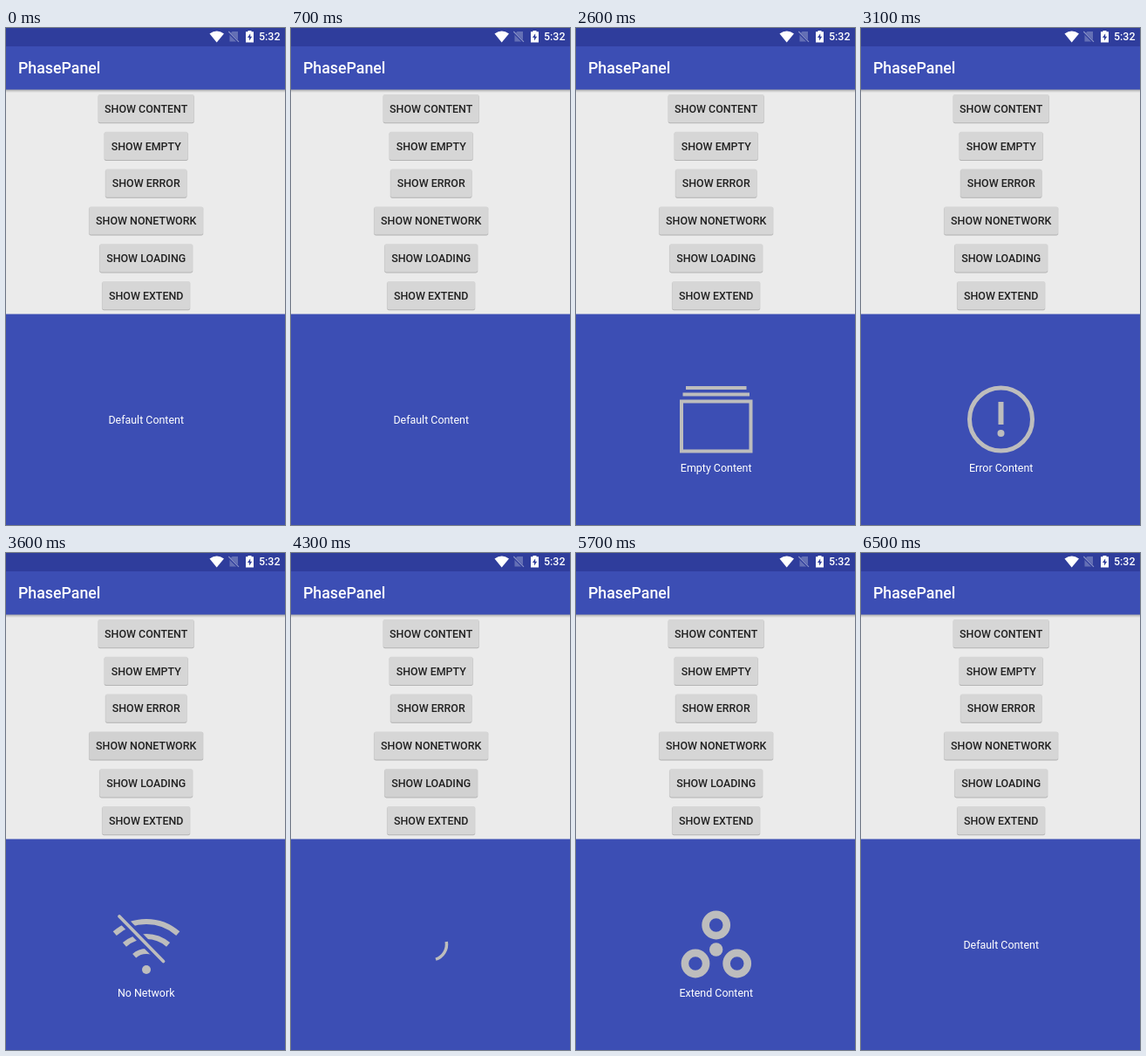
Animation of 320 by 569 pixels, one loop 6.6 s. Source, as an HTML page:

```html
<!DOCTYPE html>
<html lang="en">
<head>
<meta charset="utf-8">
<title>Status panel</title>
<style>
  html, body { margin: 0; width: 100%; height: 100%; overflow: hidden; background: #3c4eb4; }
  svg { display: block; width: 100%; height: 100%; }
  text { font-family: Roboto, sans-serif; font-size: 12.44px; fill: #fff; }
  .mid { text-anchor: middle; }
  .label { font-weight: 500; fill: #212121; }
  .line { fill: none; stroke: #bdbdbd; }
  .solid { fill: #bdbdbd; }
</style>
</head>
<body>
<svg viewBox="0 0 320 569" xmlns="http://www.w3.org/2000/svg">
  <defs>
    <linearGradient id="shade" x2="0" y2="1">
      <stop offset="0" stop-color="#000" stop-opacity=".3"/>
      <stop offset="1" stop-color="#000" stop-opacity="0"/>
    </linearGradient>
  </defs>
  <rect width="320" height="569" fill="#ebebeb"/>
  <rect y="70" width="320" height="4" fill="url(#shade)"/>
  <rect width="320" height="70.5" fill="#3c4eb4"/>
  <rect width="320" height="21" fill="#2f3d9c"/>
  <rect y="327.5" width="320" height="242" fill="#3c4eb4"/>

  <!-- status bar -->
  <path d="M233.5 6.6Q241.7 .6 250 6.6L241.7 16.4Z" fill="#fff"/>
  <path d="M259.5 4H266V15.5H256.5V7Z" fill="#6470b5"/>
  <path d="M255 4.5L267 16.5" stroke="#2f3d9c" stroke-width="2.6"/>
  <path d="M255.3 4L267 15.8" stroke="#8c95c9" stroke-width="1.1"/>
  <path d="M277.5 3H281.5V4.3H284V16.5H275V4.3H277.5Z" fill="#fff"/>
  <path d="M280.2 6.2L277 11H279V14.6L282.2 9.7H280.2Z" fill="#2f3d9c"/>
  <text x="290" y="14.4" font-weight="500">5:32</text>

  <text x="14" y="52.4" font-weight="500" style="font-size:17.78px">PhasePanel</text>
  <g id="buttons"></g>

  <g id="content">
    <text class="mid" x="160.7" y="453.3">Default Content</text>
  </g>
  <g id="empty">
    <path class="line" stroke-width="4" d="M126 412H195.500M122.500 419.500H199M121 427.500H200.500V484.500H121Z"/>
    <text class="mid" x="160.7" y="508.4">Empty Content</text>
  </g>
  <g id="error">
    <circle class="line" cx="160.5" cy="448" r="36" stroke-width="5"/>
    <path class="line" stroke-width="6" d="M160.500 428V454"/>
    <circle class="solid" cx="160.5" cy="464" r="4"/>
    <text class="mid" x="160.7" y="508.4">Error Content</text>
  </g>
  <g id="nonetwork">
    <g id="waves" class="line" stroke-width="6.2"></g>
    <circle class="solid" cx="161" cy="477" r="5"/>
    <path d="M125 411L184.500 471.500" stroke="#3c4eb4" stroke-width="10.500"/>
    <path class="line" d="M130 416L180.500 467.500" stroke-width="3.800" stroke-linecap="round"/>
    <text class="mid" x="160.7" y="508.4">No Network</text>
  </g>
  <g id="loading">
    <circle id="spinner" class="line" cx="160.5" cy="448" r="18" stroke-width="3.5"/>
  </g>
  <g id="extend">
    <g class="line" stroke-width="8.6">
      <circle cx="160.7" cy="426" r="12.1"/>
      <circle cx="137" cy="470" r="12.1"/>
      <circle cx="184.700" cy="470" r="12.1"/>
    </g>
    <circle class="solid" cx="160.7" cy="454" r="7.7"/>
    <text class="mid" x="160.7" y="508.4">Extend Content</text>
  </g>
</svg>
<script>
const LOOP = 6600;
const $ = id => document.getElementById(id);

// button: [view id, width]
const buttons = [
  ['content', 109.5], ['empty', 95.5], ['error', 93],
  ['nonetwork', 130.5], ['loading', 106.5], ['extend', 100.5]
];

// tap: [time, view id]
const taps = [
  [2300, 'empty'], [2900, 'error'], [3400, 'nonetwork'],
  [4100, 'loading'], [4700, 'extend'], [6000, 'content']
];

$('buttons').innerHTML = buttons.map(([id, w], i) => {
  const x = 160.7 - w / 2, y = 76 + i * 42.8;
  const box = (dy, grow, fill, extra = '') =>
    `<rect x="${x - grow}" y="${y + dy}" width="${w + 2 * grow}" height="32.2" rx="1.8" fill="${fill}" ${extra}/>`;
  return box(.6, .6, '#000', 'opacity=".09"') + box(1, 0, '#b4b4b4') + box(0, 0, '#d6d6d6') +
    box(0, 0, '#000', `id="press-${id}" opacity="0"`) +
    `<text class="mid label" x="160.7" y="${y + 20.8}">SHOW ${id.toUpperCase()}</text>`;
}).join('');

$('waves').innerHTML = [55, 38, 21].map(r => {
  const dx = r * Math.sin(.72), y = 477 - r * Math.cos(.72);
  return `<path d="M${161 - dx} ${y}A${r} ${r} 0 0 1 ${161 + dx} ${y}"/>`;
}).join('');

const clamp = v => Math.max(0, Math.min(1, v));

function spin(t) {
  const size = 2 * Math.PI * 18;
  const arc = size * (.4 - .3 * Math.cos(t / 1333 * 2 * Math.PI));
  $('spinner').setAttribute('stroke-dasharray', `${arc} ${size - arc}`);
  $('spinner').setAttribute('transform', `rotate(${t * .4 - 90} 160.5 448)`);
}

function draw(t) {
  let view = 'content';
  for (const [at, id] of taps) {
    if (t >= at) view = id;
    const glow = clamp((t - at + 100) / 100) * (1 - clamp((t - at - 50) / 200));
    $('press-' + id).setAttribute('opacity', .1 * glow);
  }
  for (const [id] of buttons) $(id).style.display = id === view ? '' : 'none';
  spin(Math.max(0, t - 4100));
}

function tick() {
  draw(performance.now() % LOOP);
  requestAnimationFrame(tick);
}
tick();
</script>
</body>
</html>
```
